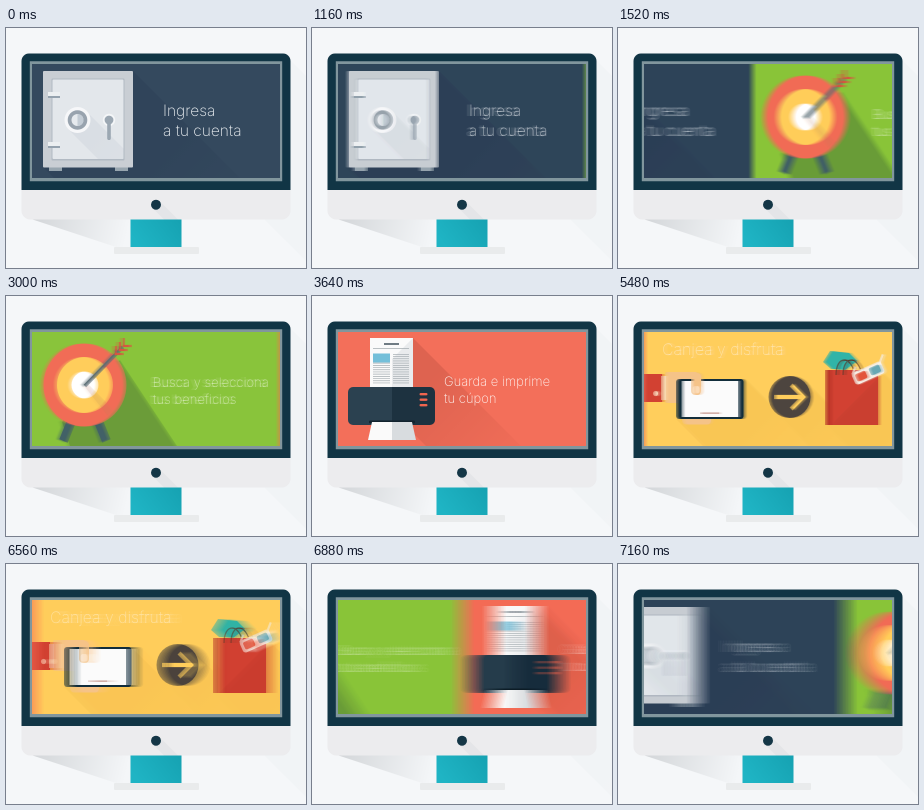
Animation, 300 px wide and 240 px high, one loop 7200 ms. Source, as an HTML page with a canvas:

```html
<!DOCTYPE html>
<html lang="es">
<head>
<meta charset="utf-8">
<title>Cupones</title>
<style>
html, body { margin: 0; width: 100%; height: 100%; overflow: hidden; background: #f5f7f9; }
canvas { display: block; width: 300px; height: 240px; }
</style>
</head>
<body>
<canvas id="stage"></canvas>
<script>
const W = 300, H = 240, LOOP = 7200, STEP = 40;
const VIEW = { x: 26, y: 36, w: 248, h: 114 };
const SHUTTER = 20, SAMPLES = 16;
const MOVES = [
  { start: 1160, time: 640 },
  { start: 3000, time: 600 },
  { start: 4800, time: 680 },
  { start: 6560, time: 640 },
];
const RED = '#d24536', SKIN = '#f6c48a', YELLOW = '#ffcf5f';
const scale = Math.max(2, Math.ceil(window.devicePixelRatio || 1));

let g;

function makeContext(canvas, w, h) {
  canvas.width = w * scale;
  canvas.height = h * scale;
  const c = canvas.getContext('2d');
  c.scale(scale, scale);
  return c;
}

function rect(x, y, w, h, color, r = 0) {
  g.fillStyle = color;
  g.beginPath();
  g.roundRect(x, y, w, h, r);
  g.fill();
}

function disc(x, y, r, color, from = 0, to = Math.PI * 2) {
  g.fillStyle = color;
  g.beginPath();
  g.arc(x, y, r, from, to);
  g.fill();
}

function trace(pts) {
  g.beginPath();
  for (const [x, y] of pts) g.lineTo(x, y);
}

function poly(color, ...pts) {
  g.fillStyle = color;
  trace(pts);
  g.fill();
}

function line(color, width, ...pts) {
  g.strokeStyle = color;
  g.lineWidth = width;
  trace(pts);
  g.stroke();
}

function fade(x0, y0, x1, y1, from, to) {
  const f = g.createLinearGradient(x0, y0, x1, y1);
  f.addColorStop(0, from);
  f.addColorStop(1, to);
  return f;
}

// Long 45° shadow of a box, fading with distance
function cast(x, y, w, h, near, far, d = 115) {
  const r = x + w, b = y + h;
  poly(fade(r, b, r + d * .7, b + d * .7, near, far),
    [r, y], [r + d, y + d], [x + d, b + d], [x, b]);
}

function inside(x, y, w, h, r, draw) {
  g.save();
  g.beginPath();
  g.roundRect(x, y, w, h, r);
  g.clip();
  draw();
  g.restore();
}

function backdrop(color) {
  rect(VIEW.x, VIEW.y, VIEW.w, VIEW.h, color);
}

function label(x, y, size, color, ...rows) {
  g.font = `200 ${size}px Inter, Roboto, sans-serif`;
  g.fillStyle = color;
  rows.forEach((row, i) => g.fillText(row, x, y + i * size * 1.3));
}

function safe() {
  backdrop('#34495e');
  cast(37, 43, 90, 96, '#30445a', '#34495e');
  for (const x of [43, 109]) rect(x, 138, 13, 5, '#97a5af');
  rect(37, 43, 90, 96.5, '#c9ced4', 1);
  rect(45.5, 50.5, 73, 82, '#b2bac3', 1);
  inside(46.5, 51.5, 71, 79.5, 1, () => {
    rect(46, 51, 72, 80, '#e3e7eb');
    cast(62, 83, 18, 18, '#d9dee4', '#dfe3e8');
  });
  for (const y of [64, 114]) {
    rect(42, y, 12, 4, '#eceff1');
    rect(42, y + 4, 12, 2, '#95a2ae');
  }
  [[13, '#f6f7f9'], [9.8, '#98a3ae'], [6, '#e6eaee']].forEach(([r, c]) => disc(71.5, 92, r, c));
  disc(71.5, 92, 6, '#c3ccd5', -Math.PI / 2, Math.PI / 2);
  disc(103, 92, 6.2, '#f4f6f8');
  rect(101.2, 92, 3.6, 20, '#9ba7b2', 2);
  disc(103, 92, 4.4, '#9ba7b2');
  label(157, 88, 15.5, '#eef2f5', 'Ingresa', 'a tu cuenta');
}

function target() {
  const x = 79, y = 89;
  backdrop('#8cc63e');
  poly('#6e9f3d', [x + 35, y - 25], [171, 150], [64, 150], [56, 126]);
  for (const side of [-1, 1]) {
    line('#47646a', 9, [x + side * 13, 124], [x + side * 21.5, 145]);
  }
  [[41.5, '#f2705a'], [28, YELLOW], [13.5, '#ffffff']].forEach(([r, c]) => disc(x, y, r, c));
  poly('rgba(190,125,90,.2)', [x, y + 2], [x + 2, y - 2], [x + 30, y + 26], [x + 24, y + 32]);
  line('#5e6f78', 3.6, [x, y + 1], [x + 38, y - 38]);
  for (let i = 0; i < 3; i++) {
    const fx = x + 31 + i * 4, fy = y - 31 - i * 4;
    line('#d75b45', 2.2, [fx, fy - 8], [fx, fy], [fx + 8, fy]);
  }
  label(147, 91, 13.1, '#f4fae9', 'Busca y selecciona', 'tus beneficios');
}

function printer() {
  const mid = 80, ink = '#a5adb2';
  backdrop('#f36f5a');
  cast(58, 42, 43, 52, '#de6350', '#f06d58');
  rect(58, 42, 43, 52, '#fafafa');
  poly('#e9ebed', [101, 42], [101, 94], [mid, 94], [mid, 63]);
  rect(72, 47, 15, 2, '#6f7b83');
  rect(61, 52, 36, .8, ink);
  for (let y = 58; y < 88; y += 2.2) {
    rect(61, y, 17, .7, ink);
    rect(81, y, 16, .7, ink);
  }
  rect(61, 57.5, 17, 9, '#74bfd9');
  inside(36, 91, 87, 38, 5, () => {
    rect(36, 91, 44, 38, '#2b4150');
    rect(mid, 91, 43, 38, '#1d3240');
  });
  rect(57, 124.5, 46, 3, '#12232e', 1.5);
  for (let i = 0; i < 3; i++) rect(107.5, 97 + i * 5.5, 8, 2.4, '#f0654f', 1.2);
  for (const [side, color] of [[-1, '#fafafa'], [1, '#d8dcdf']]) {
    poly(color, [mid, 126], [mid + side * 20, 126], [mid + side * 24, 144], [mid, 144]);
  }
  label(132, 90, 13, '#fff4f0', 'Guarda e imprime', 'tu cúpon');
}

function phone() {
  rect(47, 76, 32, 31, SKIN, 2);
  rect(64, 115, 29, 13.5, SKIN, 4);
  rect(26, 78, 18, 28, RED);
  rect(43, 80, 5, 24, '#f8d9b0');
  disc(37.5, 97.5, 2.6, '#f9d3b8');
  rect(58, 83, 67.5, 40, '#17303f', 3);
  rect(63.5, 85, 56.5, 36, '#fbfbfb');
  rect(82, 116.5, 19, 1.2, '#c79a90');
  rect(73, 77, 10, 22, SKIN, 4);
  rect(74.5, 90, 7, 7.5, '#fbdcb8', 2.5);
}

function glasses(x, y, turn) {
  g.save();
  g.translate(x, y);
  g.rotate(turn);
  rect(-16, -6.5, 32, 13, '#f8f2e9', 3);
  for (const [side, color] of [[-1, '#e4573f'], [1, '#69a9b5']]) {
    rect(side * 7.5 - 5.5, -4, 11, 8, color, 2);
    line('#f8f2e9', 2.2, [side * 15, -5], [side * 15 + 6, -11]);
  }
  g.restore();
}

function bag() {
  const x = 207, y = 74, w = 53, h = 55;
  poly('#35b5a9', [x - 2, y - 8], [x + 5, y - 19], [x + 24, y - 17], [x + 32, y - 9], [x + 20, y], [x + 6, y - 1]);
  rect(x, y, w, h, RED);
  rect(x, y, 5, h, '#bd3a2d');
  poly('rgba(110,20,15,.08)', [x + w, y + 8], [x + w, y + h], [x + 6, y + h]);
  g.strokeStyle = '#5b3a2d';
  g.lineWidth = 1.3;
  for (const dx of [11, 18]) {
    g.beginPath();
    g.moveTo(x + dx, y + 5);
    g.bezierCurveTo(x + dx, y - 15, x + dx + 15, y - 15, x + dx + 19, y + 5);
    g.stroke();
  }
  glasses(250, 77, -.42);
}

function redeem() {
  const near = '#fac757', far = '#fecd5d';
  backdrop(YELLOW);
  cast(58, 83, 67, 40, near, far);
  cast(156, 86, 30, 30, near, far);
  cast(207, 74, 53, 55, near, far);
  phone();
  disc(171.5, 101, 21, '#4f4741');
  line(YELLOW, 4.2, [156, 101], [185, 101]);
  line(YELLOW, 4.2, [173, 89], [185, 101], [173, 113]);
  bag();
  label(44, 59, 15.8, '#fff2cf', 'Canjea y disfruta');
}

function buildStrip() {
  const canvas = document.createElement('canvas');
  const slides = [safe, target, printer, redeem];
  g = makeContext(canvas, VIEW.w * slides.length, VIEW.h);
  slides.forEach((draw, i) => {
    g.save();
    g.translate(i * VIEW.w - VIEW.x, -VIEW.y);
    inside(VIEW.x, VIEW.y, VIEW.w, VIEW.h, 0, draw);
    g.restore();
  });
  return canvas;
}

function monitor() {
  const x = 15.5, w = 269;
  rect(0, 0, W, H, '#f5f7f9');
  cast(250, 33, 35, 150, '#f1f4f6', '#f4f6f8');
  poly(fade(22, 191, 118, 214, '#d2d5d8', '#f4f6f8'), [22, 190], [125, 190], [125, 219], [110, 219]);
  rect(124.5, 190, 51, 29, fade(175, 190, 135, 219, '#16a2b2', '#1fb4c4'));
  rect(108, 219, 85, 7, '#e9ebec', 1);
  inside(x, 155, w, 36.5, [0, 0, 9, 9], () => {
    rect(x, 155, w, 37, '#ececee');
    cast(146.5, 173, 7, 7, '#e4e5e8', '#e8e9eb');
  });
  rect(x, 25.5, w, 136.5, '#113545', [7.5, 7.5, 0, 0]);
  rect(23.8, 33.3, 252.4, 120, '#81969d');
  disc(150, 176.7, 5, '#143646');
}

function slideAt(t) {
  let pos = 0;
  MOVES.forEach(({ start, time }, i) => {
    const to = (i + 1) % MOVES.length;
    if (t >= start) pos = i + (to - i) * Math.min(1, (t - start) / time);
  });
  return pos;
}

function drawScreen(t) {
  const { x, y, w, h } = VIEW;
  inside(x, y, w, h, 0, () => {
    // Running average over the open shutter
    for (let i = 0; i < SAMPLES; i++) {
      const u = Math.max(0, t + (i / (SAMPLES - 1) - .5) * SHUTTER);
      g.globalAlpha = 1 / (i + 1);
      g.drawImage(strip, x - slideAt(u) * w, y, w * MOVES.length, h);
    }
  });
}

const strip = buildStrip();
const stage = makeContext(document.getElementById('stage'), W, H);
const origin = performance.now();

function frame() {
  const t = (performance.now() - origin) % LOOP;
  g = stage;
  monitor();
  drawScreen(Math.floor(t / STEP) * STEP);
  requestAnimationFrame(frame);
}
frame();
</script>
</body>
</html>
```
